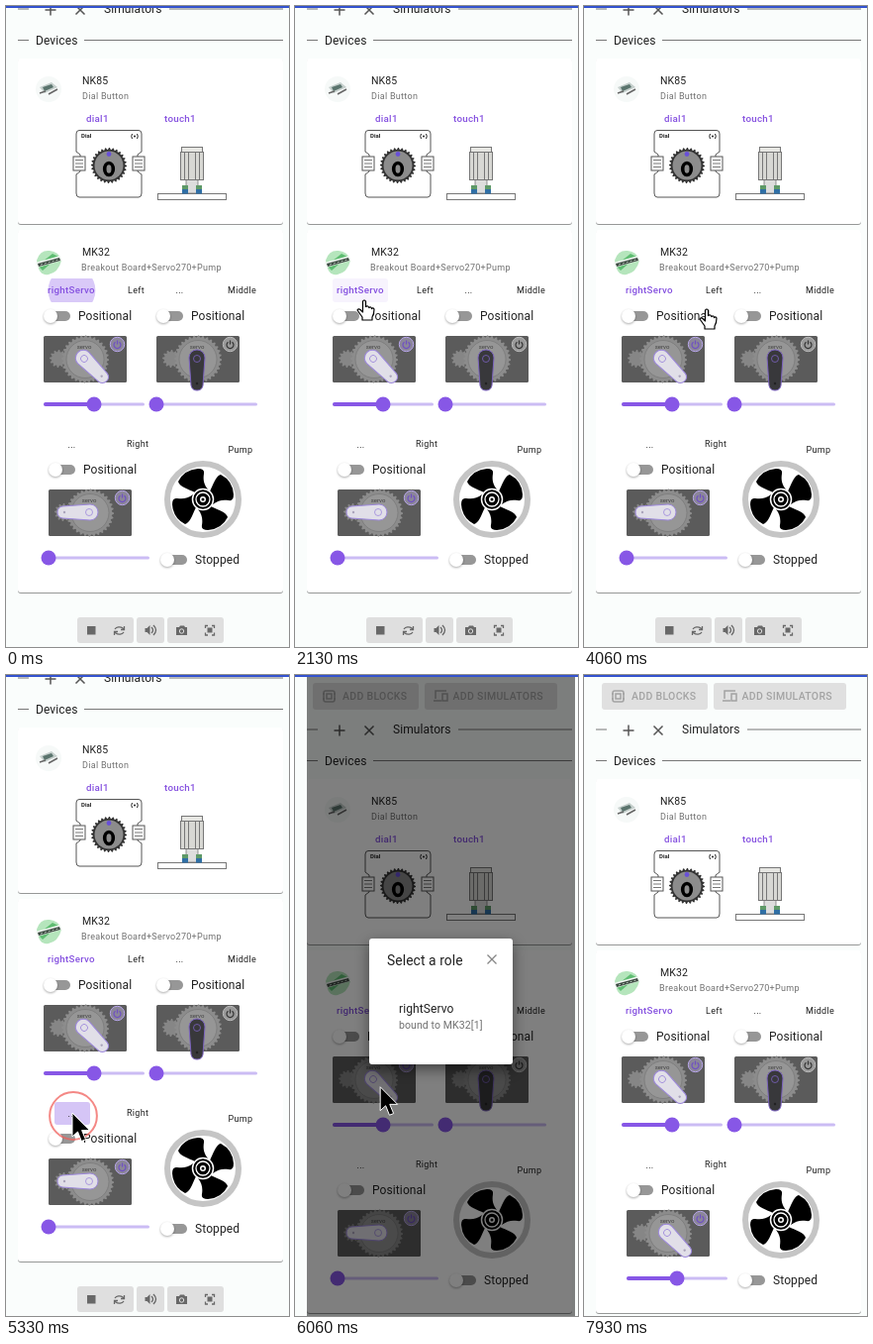
An HTML page for the animation above (8000 ms loop, 286 by 647 pixels).

```html
<!DOCTYPE html>
<html lang="en">
<head>
<meta charset="utf-8">
<title>Device simulators</title>
<style>
  html, body { margin: 0; width: 100%; height: 100%; overflow: hidden; background: #fafdfc; }
  svg { display: block; width: 286px; height: 647px; font-family: Roboto, sans-serif; fill: #212121; }
  .body { font-size: 12px; letter-spacing: .1px; }
  .name { font-size: 10.5px; letter-spacing: .1px; }
  .caption { font-size: 9px; letter-spacing: .3px; }
  .muted { fill: #707070; }
  .role { font-size: 9.75px; font-weight: 500; letter-spacing: .28px; fill: #8652e0; }
  .action { font-size: 10.5px; font-weight: 500; letter-spacing: .3px; fill: #a3a3a3; }
  .title { font-size: 13.8px; letter-spacing: .1px; }
  .card { fill: #fff; filter: drop-shadow(0 1.5px .7px #0006); }
  .line { fill: none; stroke: #777; }
</style>
</head>
<body>
<svg viewBox="0 0 286 647">
  <defs>
    <clipPath id="roleClip"><rect x="38" y="327" width="56" height="24" rx="3"/></clipPath>
    <clipPath id="emptyClip"><rect x="49" y="483" width="36" height="23" rx="3"/></clipPath>
    <clipPath id="itemClip"><rect x="93" y="318" width="109" height="54"/></clipPath>
  </defs>
  <rect width="286" height="647" fill="#fafdfc"/>
  <g id="page"></g>
  <rect id="shade" x="12" y="2" width="271" height="645" fill="#000"/>
  <g id="dialog">
    <rect x="75" y="266" width="145" height="127" rx="3" fill="#fff" style="filter:drop-shadow(0 5px 7px #0007)"/>
    <text class="title" x="93" y="293">Select a role</text>
    <path d="M194.500 282.500l9 9m0-9l-9 9" stroke="#858585" stroke-width="1.300"/>
    <rect id="itemHover" x="93" y="318" width="109" height="54" fill="#f5f5f5"/>
    <circle id="itemRipple" cx="131" cy="344" clip-path="url(#itemClip)" fill="#000" fill-opacity=".23"/>
    <text class="body" x="105" y="341">rightServo</text>
    <text class="name muted" x="105" y="357">bound to MK32[1]</text>
  </g>
  <circle id="ring" fill="none" stroke="#f0605c" stroke-width="2"/>
  <path id="hand" fill="#fff" stroke="#000" stroke-width="1.200" stroke-linejoin="round"
    d="M-1.500 1V12L-4 9.500Q-6 8-7 10L-2 17V20H8V17Q10 14 10 9Q9 7 7.500 8.500Q7 6 4.800 7.500Q4 5 1.500 6.500V1Q0-1-1.500 1Z"/>
  <path id="arrow" d="M0 0V24L5.500 19 9.300 28.500 13.500 26.800 9.600 17.600H17.500Z" fill="#000" stroke="#fff"/>
  <rect width="286" height="2" fill="#3453cf"/>
</svg>
<script>
const LOOP = 8000, SCROLL = 52, PURPLE = '#8757e6';
const CLICKS = [5130, 6930], CLICK_LENGTH = 385, OPEN = 5400, CLOSE = 7350;
const $ = id => document.getElementById(id);
const set = (id, attrs) => Object.entries(attrs).forEach(([k, v]) => $(id).setAttribute(k, v));
const ramp = (t, start, length) => Math.min(1, Math.max(0, (t - start) / length));
const smooth = k => k * k * (3 - 2 * k);

// Static drawing helpers
const text = (x, y, label, cls) => `<text x="${x}" y="${y}" class="${cls}">${label}</text>`;
const rect = (x, y, w, h, fill, more = '') => `<rect x="${x}" y="${y}" width="${w}" height="${h}" fill="${fill}" ${more}/>`;
const circle = (x, y, r, fill, more = '') => `<circle cx="${x}" cy="${y}" r="${r}" fill="${fill}" ${more}/>`;
const path = (d, fill, more = '') => `<path d="${d}" fill="${fill}" ${more}/>`;
const at = (x, y, body) => `<g transform="translate(${x} ${y})">${body}</g>`;
const line = d => path(d, 'none', 'class="line"');

function gear(x, y, r, teeth, depth, fill) {
  const points = Array.from({ length: teeth * 4 }, (_, i) => {
    const a = i * Math.PI / teeth / 2, q = i % 4 < 2 ? r : r - depth;
    return [x + q * Math.cos(a), y + q * Math.sin(a)].map(v => v.toFixed(1));
  });
  return `<polygon points="${points.join(' ')}" fill="${fill}"/>`;
}

const toggle = (x, y, label) =>
  rect(x, y - 5, 21, 10, '#979797', 'rx="5"') +
  circle(x + 1, y, 7, '#fff', 'style="filter:drop-shadow(0 1px 1px #0005)"') +
  text(x + 29, y + 4, label, 'body');

const slider = (x, y, value, id = '') => at(x, y,
  rect(0, -1.5, 102, 3, '#cbbcf4', 'rx="1.5"') +
  rect(0, -2, 102 * value, 4, PURPLE, `rx="2" id="${id}Fill"`) +
  circle(102 * value, 0, 7.5, PURPLE, `id="${id}Knob"`));

function servo(x, y, angle, bound, id = '') {
  const arm = bound ? ['#e1dfe8', '#9d88dc', '#aaa4bb'] : ['#38383b', '#7c63c0', '#222'];
  return at(x, y,
    rect(0, 0, 84, 47, '#5b5b5b', 'rx="1.5"') +
    gear(15, 23, 9, 12, 2, '#868686') +
    gear(42, 23.5, 24, 32, 2, '#8c8c8c') +
    circle(42, 23.5, 19, '#969696', 'stroke="#777" stroke-width=".7"') +
    '<text x="41" y="13" font-size="6" text-anchor="middle" fill="#444">servo</text>' +
    circle(74.5, 8.5, 7.2, bound ? '#8b8699' : '#999', `stroke="${bound ? '#b7a5ea' : '#bbb'}"`) +
    path('M72.500 6.200a3.500 3.500 0 1 0 4 0M74.500 4.500v4', 'none', `stroke="${bound ? '#6f4fc4' : '#333'}" stroke-width="1.200"`) +
    at(41, 23, `<g id="${id}Arm" transform="rotate(${angle})">` +
      path('M-8-1A8 8 0 0 1 8-1L6 27Q5 32 0 32T-6 27Z', arm[0], `stroke="${arm[1]}"`) +
      circle(0, 0, 3.5, 'none', `stroke="${arm[1]}" stroke-width=".8"`) +
      circle(0, 25, 1.2, arm[2]) + '</g>'));
}

const topButtons =
  rect(18, 8, 107, 27, '#e0e0e0', 'rx="3"') + text(48, 25, 'ADD BLOCKS', 'action') +
  rect(131, 8, 134, 27, '#e0e0e0', 'rx="3"') + text(159.5, 25, 'ADD SIMULATORS', 'action') +
  `<g fill="none" stroke="#a3a3a3" stroke-width="1.500"><rect x="29" y="16" width="11" height="11" rx="2"/>
   <path d="M32 19h5v5h-5zM28 19h2m-2 5h2m9-5h2m-2 5h2M142 24v-8h11M140 26h8"/><rect x="149" y="19" width="5" height="7"/></g>`;

const headings =
  line('M12 55H23M165 55H280M12 86.500H23M79 86.500H280') +
  path('M39.500 56h11m-5.500-5.500v11M70.500 51.500l9 9m0-9l-9 9', 'none', 'stroke="#555" stroke-width="1.500"') +
  text(99, 59, 'Simulators', 'body') + text(30, 91, 'Devices', 'body');

const thumbnails =
  circle(43, 136, 13, '#f6f9f8') + path('M34 134l12-5 6 5-13 6z', '#c5cfcc') + path('M37 134l9-3 2 3-9 4z', '#5a746d') +
  path('M34 140l6-2m3 3l9-5', 'none', 'stroke="#666" stroke-width="1.500"') +
  path('M31 309Q34 298 44 299T56 309Q53 321 43 323T31 309Z', '#b5e5bc') +
  path('M32 314l15-12 6 3-16 14z', '#5fbd72') + path('M30 311l25-7 1 5-24 7z', '#f2f7f3') + path('M32 312l22-6 1 3-22 6z', '#3c4a41') +
  path('M35 313l18-5', 'none', 'stroke="#b9c6bc" stroke-dasharray="2 2"');

const connector = x => rect(x, 204, 12, 14, '#fff', 'stroke="#555"') + line(`M${x + 2} 207.500h8m-8 3.500h8m-8 3.500h8`);
const dial =
  path('M74 177.500H134Q137 177.500 137 181V199L133 202V219L137 222V241Q137 245 134 245H74Q71 245 71 241V222L75 219V202L71 199V181Q71 177.500 74 177.500Z', '#fff', 'stroke="#555"') +
  connector(68) + connector(128) +
  '<text x="76" y="185" font-size="6" font-weight="700">Dial</text>' +
  path('M127.500 181q-1.500 2.500 0 5m5 0q1.500-2.500 0-5', 'none', 'stroke="#222"') + circle(130, 183.5, 1, '#222') +
  gear(104, 213, 18, 28, 1.8, '#333') + circle(104, 213, 14.5, '#8c8c8c') +
  '<ellipse cx="104" cy="216.500" rx="4.300" ry="6" fill="none" stroke="#000" stroke-width="3.600"/>' +
  circle(104, 201.5, 2.4, '#6950d8');

const foot = x => rect(x, 233, 6, 4, '#5f9a68') + rect(x, 237, 6, 4.5, '#2f6fa5');
const touch =
  rect(153.5, 241.500, 69, 6, '#fff', 'stroke="#777"') +
  rect(182, 227, 12, 14, '#ddd', 'stroke="#777" stroke-width=".8"') + foot(178) + foot(192) +
  rect(177.500, 194.500, 21, 5, '#e6e6e2', 'stroke="#777"') +
  rect(176.500, 199.500, 23, 28, '#d8d8d4', 'stroke="#777"') +
  line('M180.500 200v27m4-27v27m7-27v27m4-27v27');

const blade = path('M-8-7C-14-10-24-13-25-18Q-19-30-5-31Q2-31 1-26C0-20 1-15 5-10Z', '#000');
const fan = at(199, 550,
  circle(0, 0, 36, '#fff', 'stroke="#c5c5c5" stroke-width="6"') +
  [0, 90, 180, 270].map(a => `<g transform="rotate(${a})">${blade}</g>`).join('') +
  circle(0, 0, 10.5, '#000', 'stroke="#fff" stroke-width="1.500"') +
  circle(0, 0, 7, 'none', 'stroke="#fff" stroke-width="1.300"') +
  circle(0, 0, 3, '#fff') + circle(0, 0, 1.5, '#000'));

const toolbar =
  [[72, 57], [132, 28], [163, 57]].map(([x, w]) => rect(x, 669, w, 26, '#dfdfdf', 'rx="3"')).join('') +
  rect(82, 678, 8.5, 8.5, '#686868') +
  `<g fill="none" stroke="#686868" stroke-width="1.300"><path d="M110 681a5 4 0 0 1 8-1l1.500 1.500m0-3.500v3.500h-3.500M119 684a5 4 0 0 1-8 1l-1.500-1.500m0 3.500v-3.500h3.500
   M147 679q3 3 0 6m2-8q5 5 0 10M201.500 680v-2.500h2.500m4 0h2.500v2.500m0 4.500v2.500h-2.500m-4 0h-2.500v-2.500"/></g>` +
  path('M140.500 680h2l3-3v10l-3-3h-2z', '#686868') +
  path('M172 679h3l1-1.500h4l1 1.500h2v8h-11z', '#686868') + circle(177.500, 683, 2.2, 'none', 'stroke="#dfdfdf"') +
  rect(203.500, 679.500, 5, 5, '#686868');

$('page').innerHTML = topButtons + headings +
  '<rect class="card" x="12" y="105" width="268" height="167" rx="3"/><rect class="card" x="12" y="278" width="268" height="366" rx="3"/>' +
  thumbnails +
  text(77, 131, 'NK85', 'name') + text(77, 146, 'Dial Button', 'caption muted') +
  text(81, 169, 'dial1', 'role') + text(160, 169, 'touch1', 'role') + dial + touch +
  text(77, 304, 'MK32', 'name') + text(76, 319, 'Breakout Board+Servo270+Pump', 'caption muted') +
  rect(38, 327, 56, 24, '#f7f3fd', 'rx="3" id="roleHover"') +
  circle(66.5, 339, 23.9, '#d9c9f8', 'id="focus" clip-path="url(#roleClip)"') +
  rect(49, 483, 36, 23, '#f7f3fd', 'rx="3" id="emptyHover"') +
  circle(67, 494, 1, '#d5c5f6', 'id="emptyRipple" clip-path="url(#emptyClip)"') +
  text(42, 342, 'rightServo', 'role') + text(123, 342, 'Left', 'caption') +
  text(171.500, 342, '...', 'caption') + text(224, 342, 'Middle', 'caption') +
  toggle(44, 365, 'Positional') + toggle(158, 365, 'Positional') +
  servo(38, 385, -45, true) + servo(152, 385, 0, false) +
  slider(38, 454, .5) + slider(152, 454, 0) +
  text(62.500, 498, '...', 'caption') + text(122, 497, 'Right', 'caption') + text(224.500, 503, 'Pump', 'caption') +
  toggle(49, 520, 'Positional') + servo(43, 540, 90, true, 'third') + slider(43, 609, 0, 'third') +
  fan + toggle(162, 611, 'Stopped') + toolbar;

// Cursor stops: time, x, y
const STOPS = [[900, 131, 342], [1700, 70, 297], [2600, 70, 297], [3500, 124, 306], [4060, 124, 306],
  [4800, 67, 442], [5550, 67, 442], [5930, 86, 416], [6040, 86, 416], [6660, 131, 341], [7600, 131, 341]];

function cursorAt(t) {
  const i = STOPS.findIndex(stop => t < stop[0]);
  if (i < 1) return null;
  const [t0, x0, y0] = STOPS[i - 1], [t1, x1, y1] = STOPS[i];
  const k = smooth((t - t0) / (t1 - t0));
  return { x: x0 + (x1 - x0) * k, y: y0 + (y1 - y0) * k };
}

const show = (id, on) => $(id).style.display = on ? '' : 'none';

function draw(t) {
  const modal = t < CLOSE ? smooth(ramp(t, OPEN, 225)) : 1 - smooth(ramp(t, CLOSE, 195));
  const scroll = t < OPEN ? SCROLL : 0;
  set('page', { transform: `translate(0 ${-scroll})` });
  set('shade', { opacity: modal * .5 });
  set('dialog', { opacity: modal });

  const cursor = cursorAt(t);
  const over = (x, y, w, h) => cursor && cursor.x >= x && cursor.x <= x + w && cursor.y >= y && cursor.y <= y + h;
  show('roleHover', !modal && over(38, 275, 56, 24));
  show('emptyHover', !modal && over(49, 431, 36, 23));
  show('itemHover', over(93, 318, 109, 54));
  for (const id of ['hand', 'arrow']) {
    show(id, cursor && (id === 'hand') === (t < 4860));
    if (cursor) set(id, { transform: `translate(${cursor.x} ${cursor.y})` });
  }

  show('focus', t < 930);
  set('focus', { r: 23.9 * (1 - .04 * (1 - Math.cos(t / 2500 * 2 * Math.PI))) });
  set('emptyRipple', { r: 26 * smooth(ramp(t, CLICKS[0], 220)), opacity: 1 - ramp(t, 5450, 300) });
  set('itemRipple', { r: 78 * smooth(ramp(t, CLICKS[1], CLICK_LENGTH)) });

  const click = CLICKS.find(start => t >= start && t < start + CLICK_LENGTH);
  show('ring', click && cursor);
  if (click && cursor) {
    const pulse = Math.sin(Math.PI * (t - click) / CLICK_LENGTH) ** 2;
    set('ring', { cx: cursor.x + 1, cy: cursor.y + 3, r: 24 * pulse, opacity: .75 * pulse });
  }

  const value = .5 * smooth(ramp(t, 7450, 350));
  set('thirdArm', { transform: `rotate(${90 - 270 * value})` });
  set('thirdFill', { width: 102 * value });
  set('thirdKnob', { cx: 102 * value });
}

const start = performance.now();
(function tick() {
  draw((performance.now() - start) % LOOP);
  requestAnimationFrame(tick);
})();
</script>
</body>
</html>
```
